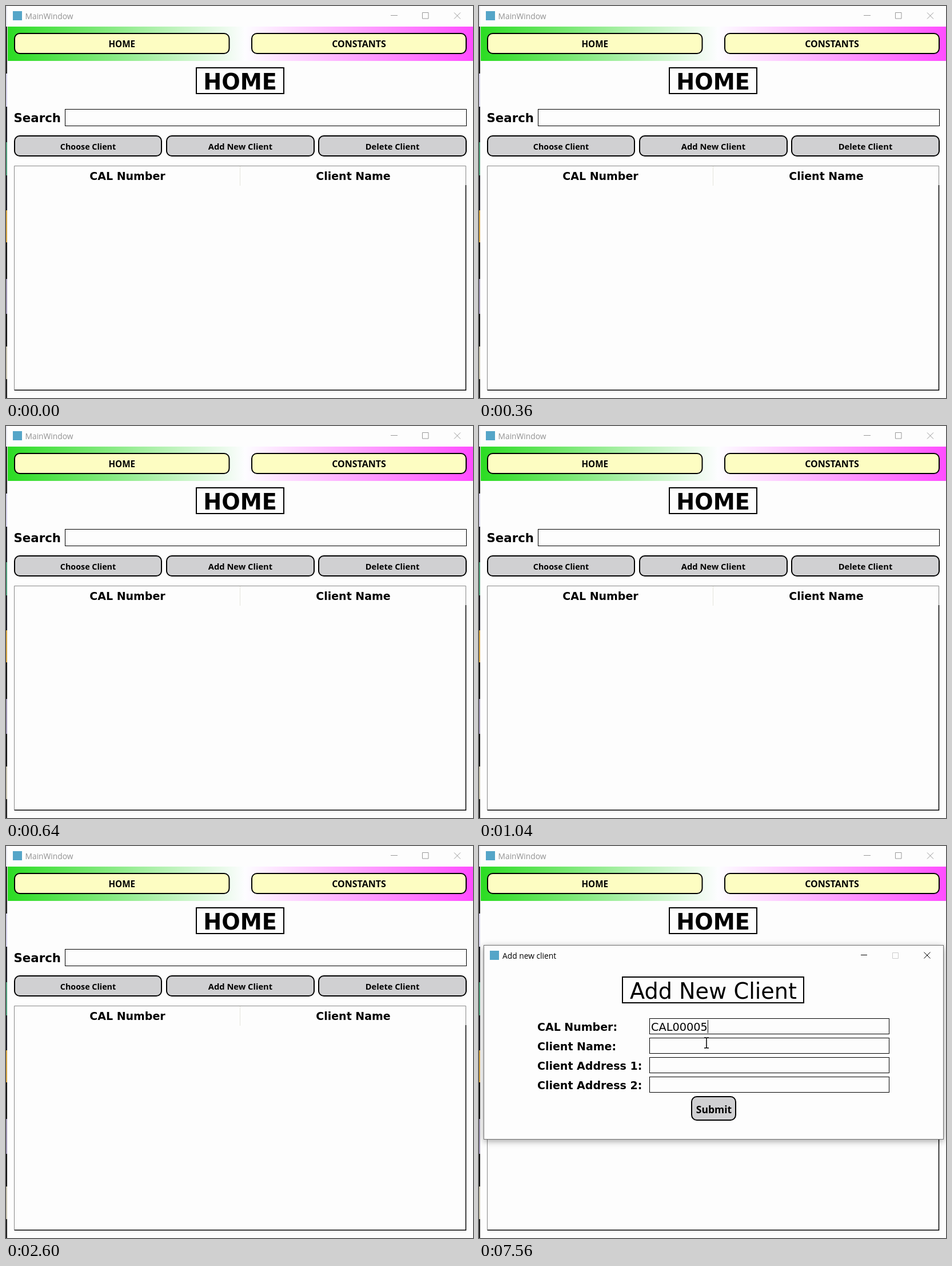
Recreate the animation shown at these times as an HTML page. Size 817 by 685 pixels, loop 8 s.

```html
<!DOCTYPE html>
<html lang="en">
<head>
<meta charset="utf-8">
<title>Client manager</title>
<style>
  html, body { margin: 0; width: 100%; height: 100%; overflow: hidden; background: #fdfdfd; }
  svg { display: block; width: 817px; height: 685px; }
  text { font-family: "DejaVu Sans", sans-serif; fill: #000; }
  .caption { font: 13.8px "Open Sans", sans-serif; }
  .title { font-size: 38.2px; text-anchor: middle; }
  .bold { font-weight: bold; font-size: 19px; }
  .mid { text-anchor: middle; }
  .hand { font: bold 14.5px "Open Sans", sans-serif; text-anchor: middle; }
  .box { fill: #fdfdfd; stroke: #000; stroke-width: 2; }
  .field { fill: #fdfdfd; stroke: #000; }
  .yellow { fill: #fdfdc2; stroke: #000; stroke-width: 2; }
  .grey { fill: #d0d0d2; stroke: #000; stroke-width: 2; }
  .line { fill: none; }
  #dialog .frame { filter: drop-shadow(0 3px 6px rgba(0, 0, 0, .35)); }
</style>
</head>
<body>
<svg viewBox="0 0 817 685">
  <defs>
    <linearGradient id="nav">
      <stop offset="0" stop-color="#2bdc22"/>
      <stop offset=".51" stop-color="#fdfdff"/>
      <stop offset="1" stop-color="#ff4dff"/>
    </linearGradient>
  </defs>
  <rect width="817" height="685" fill="#fdfdfd"/>
  <g id="desktop"></g>

  <!-- Main window -->
  <rect x="12" y="9" width="16" height="16" fill="#55a5c8"/>
  <text class="caption" x="33.5" y="22.5" style="fill:#929292">MainWindow</text>
  <path class="line" stroke="#999" d="M673 16.5h12M728.5 11.5h10.5v10.5h-10.5zM784 11.5l11 11m0-11l-11 11"/>
  <rect x="3" y="36" width="814" height="60" fill="url(#nav)"/>
  <g id="buttons"></g>

  <rect class="box" x="333" y="108" width="153" height="45"/>
  <text class="title" x="409.5" y="146" font-weight="bold">HOME</text>
  <text class="bold" x="13.5" y="203" style="font-size:21.3px">Search</text>
  <rect class="field" x="103.5" y="180.5" width="702" height="29"/>

  <path class="line" stroke="#888" d="M14.5 672V279.5H804.5V313"/>
  <path class="line" stroke="#000" stroke-width="1.5" d="M804.5 313V671.3H15"/>
  <path class="line" stroke="#e4e4dc" d="M409.5 280V314"/>
  <text class="bold mid" x="212.5" y="304">CAL Number</text>
  <text class="bold mid" x="607.5" y="304">Client Name</text>

  <!-- Dialog -->
  <g id="dialog">
    <rect class="frame" x="8.5" y="173.5" width="804" height="339" fill="#fdfdfd" stroke="#707070"/>
    <rect x="19" y="183" width="16" height="16" fill="#55a5c8"/>
    <text class="caption" x="41" y="196.5">Add new client</text>
    <path class="line" stroke="#000" d="M668 190.5h11M778.5 185.5l11 11m0-11l-11 11"/>
    <path class="line" stroke="#ccc" d="M723.5 186.5h10v10h-10z"/>
    <rect class="box" x="251" y="229" width="317" height="45"/>
    <text class="title" x="410" y="266.5">Add New Client</text>
    <g id="form"></g>
    <text x="301" y="322.5" font-size="19.3">CAL00005</text>
    <path stroke="#000" d="M400.5 304v23"/>
    <rect class="grey" x="372" y="438" width="77" height="41" rx="9"/>
    <text class="hand" x="411" y="467" style="font-size:17.5px">Submit</text>
    <path id="arrow" fill="#fff" stroke="#223" d="M.5 .5V19l4.2-4 3.4 7.5 3-1.4-3.3-7.3h5.7z"/>
    <path id="beam" class="line" stroke="#000" stroke-width="1.5" d="M-4 -8.5h3l1 1 1-1h3M0 -7.5v16M-4 9.5h3l1-1 1 1h3"/>
  </g>
</svg>
<script>
const $ = id => document.getElementById(id);
const LOOP = 8000, OPEN = 7400, STEP = 40, MOVE = 160;

// Sliver of desktop left of the window: [top, colour]
const strips = [[0, "#e8e8f0"], [36, "#222"], [118, "#d4d0ea"], [176, "#181820"], [238, "#4c9a78"],
  [296, "#181820"], [357, "#d0a040"], [413, "#111"], [477, "#9a90b0"], [538, "#111"],
  [595, "#c4c0ac"], [652, "#222"], [685]];
$("desktop").innerHTML = strips.slice(0, -1).map(([top, color], i) =>
  `<rect y="${top}" width="2" height="${strips[i + 1][0] - top}" fill="${color}"/>`).join("");

const button = (style, x, y, width, label, size) =>
  `<rect class="${style}" x="${x}" y="${y}" width="${width}" height="35" rx="9"/>
   <text class="hand" x="${x + width / 2}" y="${y + 24}" style="font-size:${size}px">${label}</text>`;
$("buttons").innerHTML =
  button("yellow", 15, 48, 375.5, "HOME", 15.2) +
  button("yellow", 430, 48, 375, "CONSTANTS", 16) +
  button("grey", 15, 227, 257, "Choose Client", 14.3) +
  button("grey", 281, 227, 258, "Add New Client", 14.7) +
  button("grey", 547, 227, 258, "Delete Client", 14.7);

$("form").innerHTML = ["CAL Number", "Client Name", "Client Address 1", "Client Address 2"]
  .map((label, i) => `<text class="bold" x="102" y="${322.5 + 34 * i}">${label}:</text>
    <rect class="field" x="298.5" y="${301.5 + 34 * i}" width="419" height="27"/>`).join("");

const show = (id, visible) => $(id).setAttribute("visibility", visible ? "inherit" : "hidden");

function draw(now) {
  const time = now % LOOP - OPEN;
  $("dialog").setAttribute("visibility", time >= 0 ? "visible" : "hidden");
  const progress = Math.min(1, Math.max(0, Math.floor(time / STEP) * STEP / MOVE));
  const place = `translate(${393 + 5 * progress} ${334 + 9.5 * progress})`;
  for (const id of ["arrow", "beam"]) $(id).setAttribute("transform", place);
  // The pointer turns into a text beam once it is over the second field.
  show("arrow", time < STEP);
  show("beam", time >= STEP);
  requestAnimationFrame(draw);
}
draw(performance.now());
</script>
</body>
</html>
```
